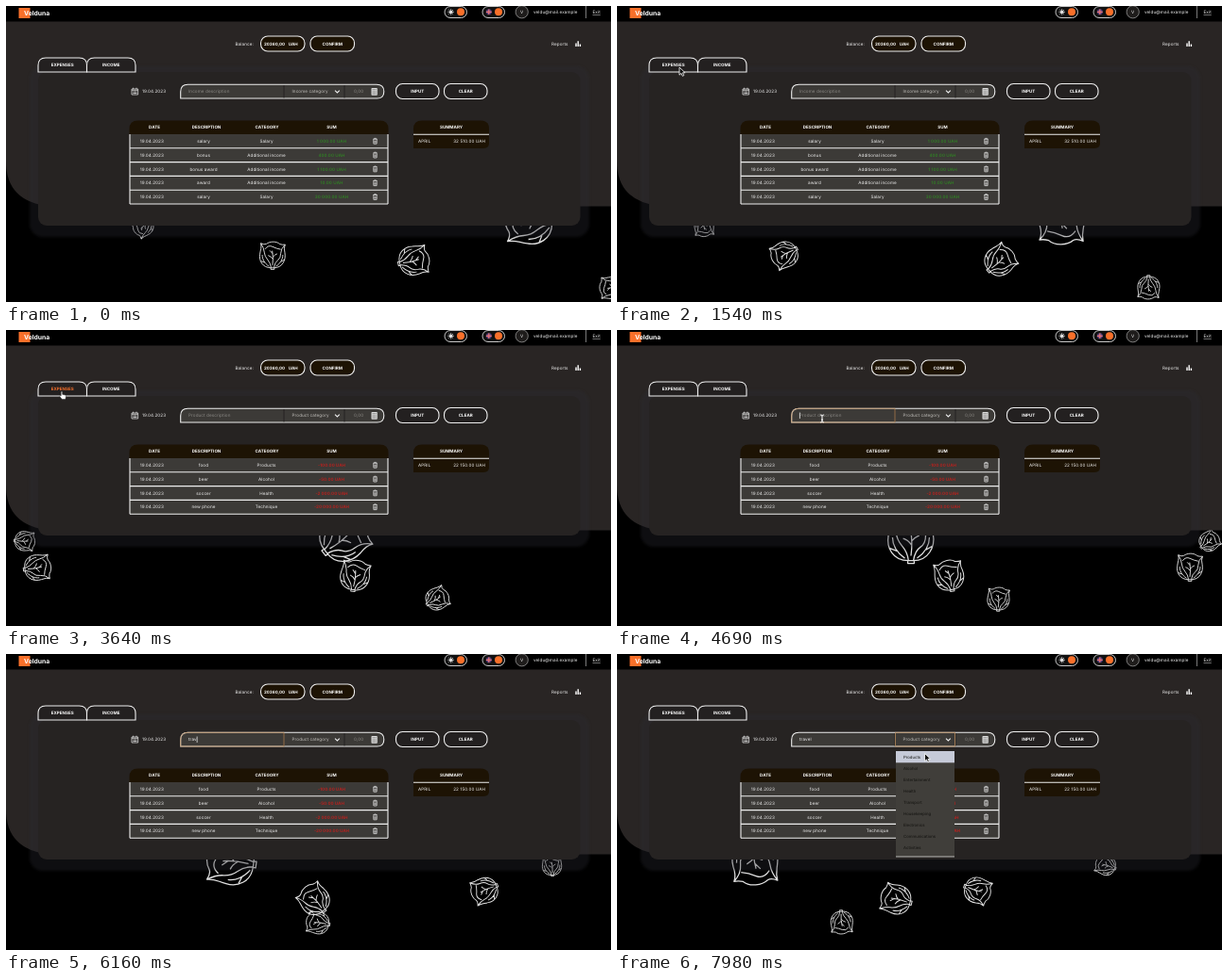
These frames come from a looping animation (640 px wide and 314 px high, 8000 ms). An HTML page:

```html
<!DOCTYPE html>
<html lang="en">
<head>
<meta charset="utf-8">
<title>Budget tracker</title>
<style>
  html, body { margin: 0; width: 100%; height: 100%; overflow: hidden; background: #000; }
  svg { display: block; width: 100vw; height: 100vh; }
  text { font: 4.6px Inter, sans-serif; letter-spacing: .1px; fill: #f2f2f2; text-rendering: geometricPrecision; }
  .bold { font-size: 4.5px; font-weight: 700; letter-spacing: 0; fill: #fff; }
  .mid { text-anchor: middle; }
  .end { text-anchor: end; }
  .dim { fill: #8b8985; }
  .soft { fill: #c4c2be; }
  .plus { font-weight: 500; fill: #2f8a22; }
  .minus { font-weight: 700; letter-spacing: 0; fill: #b3221f; }
  .brand { font-size: 6.8px; }
  .option { font-size: 4.3px; letter-spacing: 0; fill: #12120f; }
  .line { fill: none; stroke: #eee; stroke-width: 1.1; }
  .icon { fill: none; stroke: #ddd; stroke-width: .8; }
  .chevron { fill: none; stroke: #eee; stroke-width: 1.1; }
  .focus { fill: none; stroke: #b98c5c; stroke-width: .8; }
</style>
</head>
<body>
<svg id="stage" viewBox="0 0 640 314" preserveAspectRatio="none"></svg>
<script>
const LOOP = 8000, SWITCH = 3500;
const ORANGE = '#f9702a', BROWN = '#1d1304', FIELD = '#3c3a37';

const label = (x, y, str, cls = '', attrs = '') =>
  `<text x="${x}" y="${y + 1.65}" class="${cls}" ${attrs}>${str}</text>`;
const box = (x, y, w, h, r, fill, attrs = '') =>
  `<rect x="${x}" y="${y}" width="${w}" height="${h}" rx="${r}" fill="${fill}" ${attrs}/>`;
const path = (d, cls = 'line', attrs = '') => `<path d="${d}" class="${cls}" ${attrs}/>`;
const disc = (x, y, r, fill, attrs = '') => `<circle cx="${x}" cy="${y}" r="${r}" fill="${fill}" ${attrs}/>`;
const roundTop = (x, y, w, h, r) =>
  `M${x} ${y + h}V${y + r}q0 ${-r} ${r} ${-r}h${w - 2 * r}q${r} 0 ${r} ${r}V${y + h}z`;

const button = (x, y, w, h, str, fill) =>
  box(x, y, w, h, 7, fill, 'stroke="#eee" stroke-width="1.1"') +
  label(x + w / 2, y + h / 2, str, 'bold mid');

const tab = (x, str, id) =>
  path(roundTop(x, 55, 51.5, 15, 8), '', 'fill="#232020" stroke="#eee" stroke-width="1.1"') +
  label(x + 25.7, 62.3, str, 'bold mid', `id="${id}"`);

const toggle = x =>
  box(x, .5, 23.5, 12, 6, '#111', 'stroke="#ddd" stroke-width=".9"') + disc(x + 17, 6.3, 4, ORANGE);

const trash = y => path(
  `M388 ${y - 2}h5M389.6 ${y - 2}v-.9h1.8v.9M388.7 ${y - 1.2}l.2 4.1h3.2l.2 -4.1M390 ${y - .6}v2.6M391 ${y - .6}v2.6`, 'icon');

function table(rows, sumClass) {
  const pitch = 14.8, bottom = 136 + rows.length * pitch;
  let out = box(131, 136, 273, bottom - 136, 0, FIELD) +
    path(roundTop(130.5, 121.5, 274, 14.5, 9), '', `fill="${BROWN}"`);
  [[157, 'DATE'], [212, 'DESCRIPTION'], [276, 'CATEGORY'], [344.5, 'SUM']]
    .forEach(([x, s]) => out += label(x, 128.5, s, 'bold mid'));
  rows.forEach(([what, category, sum], i) => {
    const y = 143.3 + i * pitch;
    out += label(154.3, y, '19.04.2023', 'mid') + label(209, y, what, 'mid') +
      label(275.5, y, category, 'mid') + label(344.5, y, sum + ' UAH', 'mid ' + sumClass) + trash(y) +
      path(`M131 ${136 + (i + 1) * pitch}h273`);
  });
  return out + path(`M131 136V${bottom}M404 136V${bottom}`);
}

const view = (id, kind, total, rows, sumClass) => `<g id="${id}">
  ${table(rows, sumClass)}
  ${label(302.5, 90.6, kind + ' category', 'soft')}
  ${label(507, 143.6, total + ' UAH', 'end')}</g>`;

const cabbageArt = path('M-.1 .95C-.75 .95 -1 .4 -.92 -.05C-.88 -.4 -.78 -.5 -.85 -.85Q-.6 -.72 -.45 -.8' +
  'C-.2 -1 .3 -1.02 .55 -.78Q.75 -.72 .92 -.75Q.8 -.5 .9 -.15C1 .4 .7 .95 .1 .95z' +
  'M-.85 -.85Q-.62 -.5 -.6 -.2T-.36 .35T-.1 .95M.92 -.75Q.6 -.45 .6 -.1T.38 .4T.1 .95' +
  'M-.25 .85C-.6 .6 -.75 .3 -.75 0M-.58 .55L-.85 .45M.25 .85C.6 .6 .75 .3 .75 0M.62 .5L.88 .35' +
  'M0 .75Q.08 .2 -.02 -.3M.02 .3Q-.12 .1 -.32 .04M.03 .15Q.15 0 .34 -.08M0 -.1L-.2 -.32' +
  'M-.55 -.42Q-.3 -.75 0 -.6T.6 -.4M-.13 .94V1.06H.13V.94', '');

// x: [time, x] points; y: before and after the tab switch; upright: x where the stem points down
const linear = (x, speed) => [[0, x], [LOOP, x - speed * LOOP]];
const cabbages = [
  { x: linear(145, .0343), y: [234, 224], r: 11, upright: -63 },
  { x: linear(784, .0335), y: [234, 224], r: 11, upright: 580 },
  { x: linear(282, .0682), y: [264, 252], r: 14.5, upright: 282 },
  { x: linear(926, .0682), y: [264, 251], r: 14.5, upright: 606 },
  { x: linear(432, .0172), y: [270, 260], r: 16.5, upright: 362 },
  { x: [[0, 553], [3640, 358], [4690, 311], [LOOP, 145]], y: [228, 220], r: 26, upright: 311 },
  { x: linear(640, .0504), y: [299, 285], r: 12.5, upright: 402 },
];

const options = ['Products', 'Alcohol', 'Entertainment', 'Health', 'Transport',
  'Housekeeping', 'Electronics', 'Communications', 'Activities'];

const header = box(0, 0, 640, 16.5, 0, '#000') +
  box(13.5, 2, 12, 11, 0, ORANGE) + label(19, 8, 'Velduna', 'bold brand') +
  toggle(464) + disc(470.7, 6.3, 1.6, '#fff') +
  path('M470.7 3.1v6.4M467.5 6.3h6.4M468.4 4l4.6 4.6M468.4 8.6l4.6 -4.6', 'icon') +
  toggle(504) + disc(510.8, 6.3, 3, '#57407c') +
  path('M508 6.3h5.6M510.8 3.5v5.6', '', 'stroke="#e77" stroke-width="1.2"') +
  disc(545.7, 6.3, 6.6, '#1e1c1b', 'stroke="#aaa" stroke-width=".7"') + label(545.7, 6.3, 'V', 'mid') +
  label(558, 6.5, 'veldu@mail.example') +
  path('M613.5 0V13', '', 'stroke="#999" stroke-width=".8"') +
  label(620.5, 6.5, 'Exit', '', 'font-weight="500" text-decoration="underline"');

const toolbar = label(242.5, 40, 'Balance:') +
  box(269.5, 32, 46.5, 16, 7.5, BROWN, 'stroke="#eee" stroke-width="1.1"') +
  label(273, 40.2, '20360,00', 'bold') + label(298.7, 40.2, 'UAH', 'bold') +
  button(322, 32, 46.5, 16, 'CONFIRM', BROWN) +
  label(577, 40, 'Reports') + path('M603 43V39.5M605.2 43V37.3M607.4 43V40.5', '', 'stroke="#fff" stroke-width="1.4"');

const form = path('M133 88h6.6v6H133zM133 89.3h6.6M134.6 86.7v1.6M138 86.7v1.6M134.4 91h4M134.4 92.5h4', 'icon') +
  label(144, 90.8, '19.04.2023') +
  path('M184.7 98V91q0 -7.7 7.7 -7.7H392q7.8 0 7.8 7.5T392 98z', '', `fill="${FIELD}" stroke="#eee" stroke-width="1.1"`) +
  path('M294 84V97.5M358 84V97.5', '', 'stroke="#1f1d1c" stroke-width=".8"') +
  label(193, 90.6, '', '', 'id="typed"') +
  path('M348 89.6l2.4 2.4 2.4 -2.4', 'chevron') +
  label(368, 90.8, '0,00', 'dim') +
  box(386.5, 87, 6.3, 7.8, .8, '#ddd') +
  path('M387.6 88.8h4.1M387.6 91h4.1M387.6 93h4.1', '', `stroke="${FIELD}" stroke-width=".8" stroke-dasharray="1 .55"`) +
  button(412.5, 82.5, 45.5, 16, 'INPUT', '#232020') + button(463.5, 82.5, 45.5, 16, 'CLEAR', '#232020');

const summary = path(roundTop(431, 121.5, 80, 14.5, 9), '', `fill="${BROWN}"`) +
  path('M431 136h80v9q0 6 -6 6h-74z', '', `fill="${BROWN}"`) +
  path('M431 136.3h80') + label(471, 128.5, 'SUMMARY', 'bold mid') + label(436, 143.6, 'APRIL');

const menu = `<g id="menu">${path('M294.5 83.3H357.5V98H294.5z', 'focus')}
  ${box(295, 103, 62, 112, 0, '#403e3a')}${box(295, 103, 62, 12.3, 0, '#c6cad8')}
  ${options.map((s, i) => label(303, 109.3 + i * 12, s, 'option')).join('')}
  ${path('M295 215h62', 'icon')}</g>`;

const pointers = `<g id="pointer">
  ${path('M0 0V8.2L2 6.4L3.3 9.3L4.8 8.6L3.5 5.8H6.1z', '', 'id="arrow" fill="#111" stroke="#fff" stroke-width=".8"')}
  ${path('M-.8 .6q.8 -1.1 1.5 0V3.3l3 .7q1 .4 .8 1.5l-.6 3H.2L-2.3 5.3q0 -1.2 1.5 -.4z', '', 'id="hand" fill="#fff" stroke="#222" stroke-width=".5"')}
  ${path('M-1.8 -4Q0 -4 0 -2.8Q0 -4 1.8 -4M0 -3V3M-1.8 4Q0 4 0 2.8Q0 4 1.8 4M-1 1.2h2', '', 'id="beam" fill="none" stroke="#fff"')}
  </g>`;

document.getElementById('stage').innerHTML = `
  <defs><filter id="blur"><feGaussianBlur stdDeviation="1.5"/></filter></defs>
  ${box(0, 0, 640, 314, 0, '#000')}
  ${cabbages.map(c => `<g class="cabbage" fill="none" stroke="#e0e0e0" stroke-linejoin="round"
    stroke-width="${(.5 + .03 * c.r) / c.r}">${cabbageArt}</g>`).join('')}
  ${path('M0 16H640V212.5H47Q0 208 0 165z', '', 'fill="#292524"')}
  ${box(25, 64, 592, 0, 14, '#2a2c33', 'id="shadow" opacity=".35" filter="url(#blur)"')}
  ${box(34, 70, 573.5, 0, 9, '#262322', 'id="panel"')}
  ${header}${toolbar}${tab(34, 'EXPENSES', 'expensesTab')}${tab(85.5, 'INCOME', 'incomeTab')}${form}
  ${label(193, 90.6, '', 'dim', 'id="hint"')}
  ${path('M184.7 98V91q0 -7.7 7.7 -7.7H294V98z', 'focus', 'id="inputFocus"')}
  ${path('M0 87.5V94', '', 'id="caret" stroke="#fff" stroke-width=".7"')}
  ${summary}
  ${view('income', 'Income', '32 510.00', [
    ['salary', 'Salary', '1 000.00'], ['bonus', 'Additional income', '400.00'],
    ['bonus award', 'Additional income', '1 100.00'], ['award', 'Additional income', '10.00'],
    ['salary', 'Salary', '30 000.00']], 'plus')}
  ${view('expenses', 'Product', '22 150.00', [
    ['food', 'Products', '-100.00'], ['beer', 'Alcohol', '-50.00'],
    ['soccer', 'Health', '-2 000.00'], ['new phone', 'Technique', '-20 000.00']], 'minus')}
  ${menu}
  ${disc(0, 0, 10, 'rgba(110,110,110,.4)', 'id="ring" stroke="#999" stroke-width="1.2"')}
  ${pointers}`;

const el = id => document.getElementById(id);
const show = (id, on) => { el(id).style.display = on ? '' : 'none'; };
const within = (t, a, b) => t >= a && t < b;
const ease = k => k * k * (3 - 2 * k);

function at(points, t, curve = k => k) {
  let i = 0;
  while (i < points.length - 2 && t >= points[i + 1][0]) i++;
  const [a, b] = [points[i], points[i + 1]];
  const k = curve(Math.min(1, Math.max(0, (t - a[0]) / (b[0] - a[0]))));
  return a.slice(1).map((v, n) => v + (b[n + 1] - v) * k);
}

const pointerPath = [[400, -10, 92], [840, 18, 84], [1400, 66, 65], [1750, 66, 65], [2300, 59, 65],
  [3750, 59, 65], [4350, 217, 94], [6750, 217, 94], [7200, 322, 91], [7480, 322, 91], [7750, 325.5, 105.5]];
const clicks = [[2450, 2800], [4400, 4620], [7280, 7480]];
const cabbageNodes = document.querySelectorAll('.cabbage');

function render(t) {
  const spent = t >= SWITCH, height = spent ? 148 : 163;
  cabbages.forEach((c, i) => {
    const [x] = at(c.x, t);
    cabbageNodes[i].setAttribute('transform',
      `translate(${x} ${c.y[+spent]}) rotate(${(x - c.upright) * 1.12}) scale(${c.r})`);
  });
  el('panel').setAttribute('height', height);
  el('shadow').setAttribute('height', height + 18);
  show('income', !spent);
  show('expenses', spent);

  const typed = 'travel'.slice(0, Math.max(0, Math.floor((t - 5700) / 130) + 1));
  el('typed').textContent = typed;
  el('hint').textContent = typed ? '' : (spent ? 'Product' : 'Income') + ' description';
  const focused = within(t, 4450, 7300);
  show('inputFocus', focused);
  show('caret', focused && (within(t, 5700, 6700) || (t - 4450) % 1000 < 500));
  el('caret').setAttribute('transform', `translate(${193.4 + (typed ? el('typed').getComputedTextLength() : 0)} 0)`);
  show('menu', t >= 7350);

  const [x, y] = at(pointerPath, t, ease);
  const hand = spent && x < 85, beam = x > 185 && x < 294 && y > 83 && y < 98;
  el('pointer').setAttribute('transform', `translate(${x} ${y})`);
  show('pointer', !within(t, 5600, 6750));
  show('hand', hand);
  show('beam', beam);
  show('arrow', !hand && !beam);
  el('expensesTab').style.fill = hand ? ORANGE : '';
  el('ring').setAttribute('transform', `translate(${x} ${y})`);
  show('ring', clicks.some(([a, b]) => within(t, a, b)));
}

const start = performance.now();
(function tick() {
  render((performance.now() - start) % LOOP);
  requestAnimationFrame(tick);
})();
</script>
</body>
</html>
```
